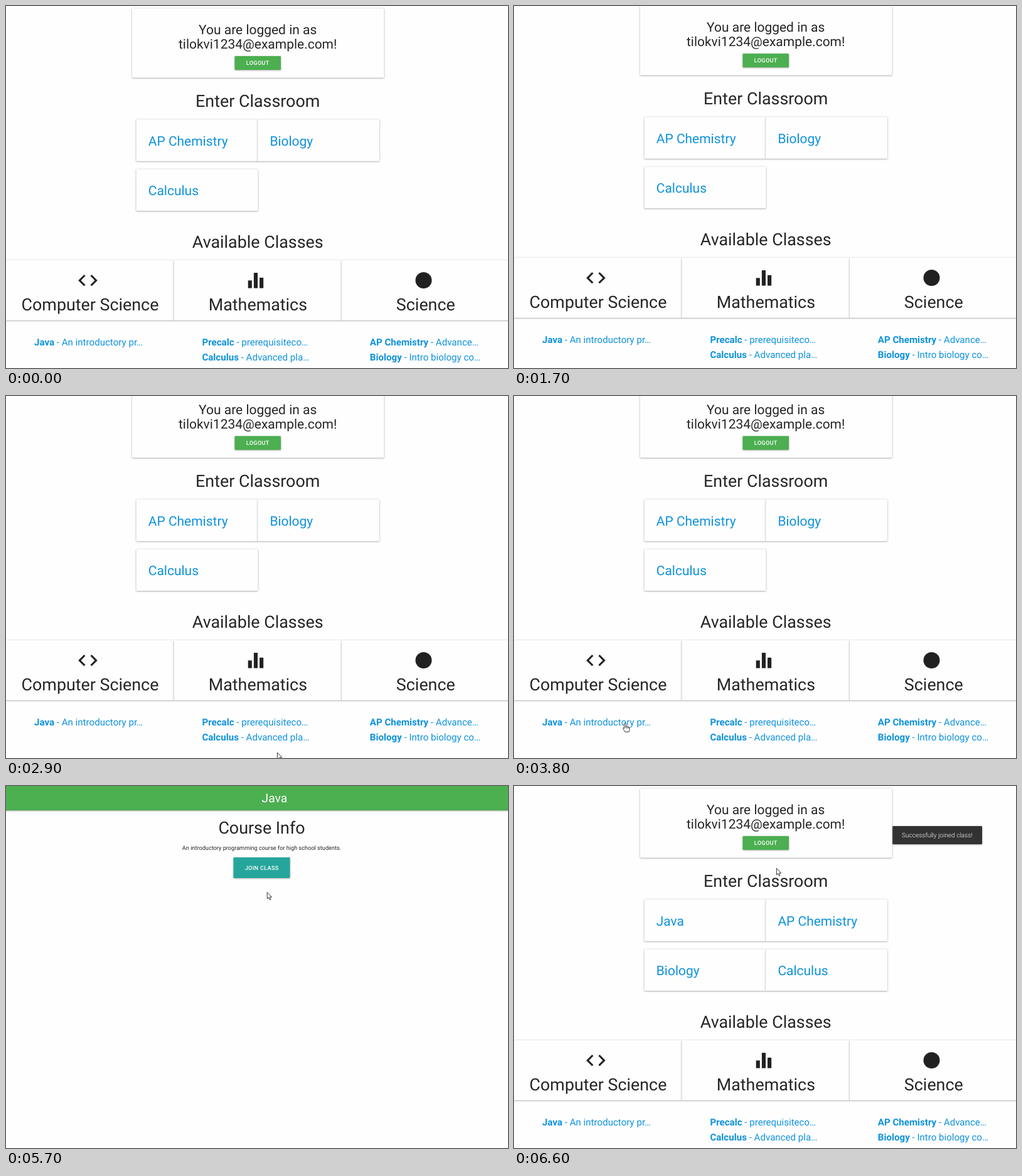
An HTML page that plays this animation: 800x578 px, repeating every 7.1 s.

```html
<!DOCTYPE html>
<html lang="en">
<head>
<meta charset="utf-8">
<title>Classroom</title>
<style>
  html, body { margin: 0; width: 100%; height: 100%; overflow: hidden; background: #fefefe; }
  svg { display: block; width: 800px; height: 578px; }
  text { font-family: Roboto, sans-serif; fill: #262626; white-space: pre; text-rendering: geometricPrecision; }
  .h3 { font-size: 26.85px; }
  .h4 { font-size: 20.98px; }
  .h5 { font-size: 15.1px; }
  .brand { font-size: 19.3px; fill: #fff; }
  .small { font-size: 9.18px; }
  .btn { font-size: 9.18px; font-weight: 500; letter-spacing: .3px; fill: #fff; }
  .toast { font-size: 10.1px; font-weight: 300; fill: #fff; }
  .link { fill: #0f92dc; }
  .bold { font-weight: 700; }
  .mid { text-anchor: middle; }
  .raised { filter: drop-shadow(0 1.1px .8px rgba(0,0,0,.25)) drop-shadow(0 .5px 1.4px rgba(0,0,0,.14)); }
  .high { filter: drop-shadow(0 2px 1.6px rgba(0,0,0,.28)) drop-shadow(0 1px 3px rgba(0,0,0,.15)); }
</style>
</head>
<body>
<svg id="stage" viewBox="0 0 800 578"></svg>
<script>
const LOOP = 7100, STEP = 100;
const GREEN = '#4caf50', TEAL = [38, 166, 154], TEAL_HOVER = [43, 187, 173], TEAL_PRESSED = [106, 193, 187];
const stage = document.getElementById('stage');

function add(parent, tag, attrs, content) {
  const el = document.createElementNS('http://www.w3.org/2000/svg', tag);
  for (const key in attrs) el.setAttribute(key, attrs[key]);
  if (content) el.textContent = content;
  return parent.appendChild(el);
}
const group = parent => add(parent, 'g', {});
const label = (parent, x, y, cls, content) => add(parent, 'text', { x, y, class: cls }, content);
const box = (parent, x, y, width, height, fill = '#fefefe', cls = 'raised') =>
  add(parent, 'rect', { x, y, width, height, rx: 1.2, fill, class: cls });
const icon = (parent, x, y, d) =>
  add(parent, 'path', { d, fill: '#212121', transform: `translate(${x} ${y}) scale(1.53)` });

function classCards(parent, names) {
  const g = group(parent);
  names.forEach((name, i) => {
    const x = 207.6 + (i % 2) * 193.6, y = 181.3 + Math.floor(i / 2) * 79.4;
    box(g, x, y, 193.8, 66.4);
    label(g, x + 19.2, y + 41.2, 'h4 link', name);
  });
  return g;
}

function column(parent, i, title, courses) {
  const x = i * 267.4;
  box(parent, x, 406, 267.4, 95.8);
  label(parent, x + 134, 486, 'h3 mid', title);
  courses.forEach(([name, about], row) => {
    const line = label(parent, x + 45, 541.6 + row * 24, 'h5 link');
    add(line, 'tspan', { class: 'bold' }, name);
    add(line, 'tspan', {}, ' - ' + about);
  });
}

// Dashboard
const home = group(stage);
box(home, 201, 4, 401.4, 110.5);
label(home, 401.2, 45.4, 'h4 mid', 'You are logged in as');
label(home, 401.2, 68.2, 'h4 mid', 'tilokvi1234@example.com!');
box(home, 364.5, 80, 73.5, 22, GREEN);
label(home, 401.2, 94.3, 'btn mid', 'LOGOUT');
label(home, 401.2, 160.8, 'h3 mid', 'Enter Classroom');
const before = classCards(home, ['AP Chemistry', 'Biology', 'Calculus']);
const after = classCards(home, ['Java', 'AP Chemistry', 'Biology', 'Calculus']);
label(home, 401.2, 385.8, 'h3 mid', 'Available Classes');
column(home, 0, 'Computer Science', [['Java', 'An introductory pr…']]);
column(home, 1, 'Mathematics', [['Precalc', 'prerequisiteco…'], ['Calculus', 'Advanced pla…']]);
column(home, 2, 'Science', [['AP Chemistry', 'Advance…'], ['Biology', 'Intro biology co…']]);
icon(home, 112.1, 419.8, 'M9.4 16.6L4.8 12l4.6-4.6L8 6l-6 6 6 6zM14.6 16.6l4.6-4.6-4.6-4.6L16 6l6 6-6 6z');
icon(home, 379.6, 420, 'M10 20h4V4h-4zM4 20h4v-8H4zM16 9v11h4V9z');
add(home, 'circle', { cx: 665.5, cy: 438, r: 13, fill: '#212121' });

const toast = group(stage);
box(toast, 603.3, 64, 142.7, 29, '#323232');
label(toast, 618, 82, 'toast', 'Successfully joined class!');

// Course page
const course = group(stage);
add(course, 'rect', { x: -5, y: -5, width: 810, height: 44, fill: GREEN, class: 'raised' });
label(course, 407.5, 26, 'brand', 'Java');
label(course, 407.5, 76, 'h3 mid', 'Course Info');
label(course, 407.5, 101.6, 'small mid', 'An introductory programming course for high school students.');
const join = box(course, 362.5, 114, 90, 33);
label(course, 407.7, 134.3, 'btn mid', 'JOIN CLASS');

// Pointers, with the hotspot at 0,0
const pen = { fill: '#fff', stroke: '#222', 'stroke-width': .9, 'stroke-linejoin': 'round' };
const arrow = add(stage, 'path', { ...pen, d: 'M.4 .4V10.8L2.8 8.6 4.5 12.5 6.1 11.8 4.5 8H7.8Z' });
const hand = add(stage, 'path', { ...pen,
  d: 'M-1.2 9V1.2A1.2 1.2 0 0 1 1.2 1.2V5.5C2.2 4.6 3.4 5 3.5 6 4.4 5.3 5.5 5.7 5.6 6.6 6.6 6.2 7.2 6.8 7.2 7.8V10.5' +
     'C7.2 12 6.3 13 6.2 14.3H-.2C-.5 12.6-3.4 9.8-3.4 8.4-3.3 7.2-2 7.4-1.2 9ZM1.2 5.5V8.5M3.5 6V8.7M5.6 6.6V9' });

// Pointer path: time, x, y
const path = [
  [2800, 465, 572], [2900, 432, 569], [3100, 432, 569], [3400, 330, 545], [3800, 177, 522],
  [4700, 176, 522], [4800, 215.5, 476], [4900, 326, 345], [5000, 413, 251],
  [5300, 413, 251], [5600, 415, 185], [5900, 417.5, 138], [6100, 418, 131]
];

const clamp = v => Math.min(1, Math.max(0, v));
const span = (t, a, b) => clamp((t - a) / (b - a));
const mix = (a, b, u) => a + (b - a) * u;
const blend = (a, b, u) => `rgb(${a.map((v, i) => Math.round(mix(v, b[i], u)))})`;
const show = (el, on) => el.setAttribute('visibility', on ? 'inherit' : 'hidden');

function pointerAt(t) {
  const next = path.findIndex(p => p[0] > t);
  if (next < 0) return path[path.length - 1].slice(1);
  const a = path[Math.max(0, next - 1)], b = path[next], u = span(t, a[0], b[0]);
  return [mix(a[1], b[1], u), mix(a[2], b[2], u)];
}

function draw(t) {
  const onCourse = t >= 4000 && t < 6400, joined = t >= 6400;
  show(course, onCourse);
  show(home, !onCourse);
  show(before, !joined && !onCourse);
  show(after, joined);

  const scroll = joined ? 0 : 16 * span(t, 1500, 1900) ** 2;
  home.setAttribute('transform', `translate(0 ${-Math.round(scroll)})`);

  const [x, y] = pointerAt(t);
  const overLink = t < 4000 && x < 219 && y < 532;
  const overJoin = onCourse && y > 113 && y < 147;
  show(arrow, t >= 2800 && !overLink && !overJoin);
  show(hand, overLink || overJoin);
  for (const p of [arrow, hand]) p.setAttribute('transform', `translate(${x} ${y})`);

  const press = span(t, 6100, 6300);
  join.setAttribute('fill', press ? blend(TEAL_HOVER, TEAL_PRESSED, press)
    : blend(TEAL, TEAL_HOVER, overJoin ? span(t, 5700, 6000) : 0));
  join.setAttribute('class', overJoin ? 'high' : 'raised');

  const rise = 1 - (1 - span(t, 6400, 6600)) ** 3;
  show(toast, joined);
  toast.setAttribute('opacity', rise);
  toast.setAttribute('transform', `translate(0 ${21.4 * (1 - rise)})`);
}

const start = performance.now();
function tick() {
  const t = (performance.now() - start) % LOOP;
  draw(Math.floor(t / STEP) * STEP);
  requestAnimationFrame(tick);
}
tick();
</script>
</body>
</html>
```
